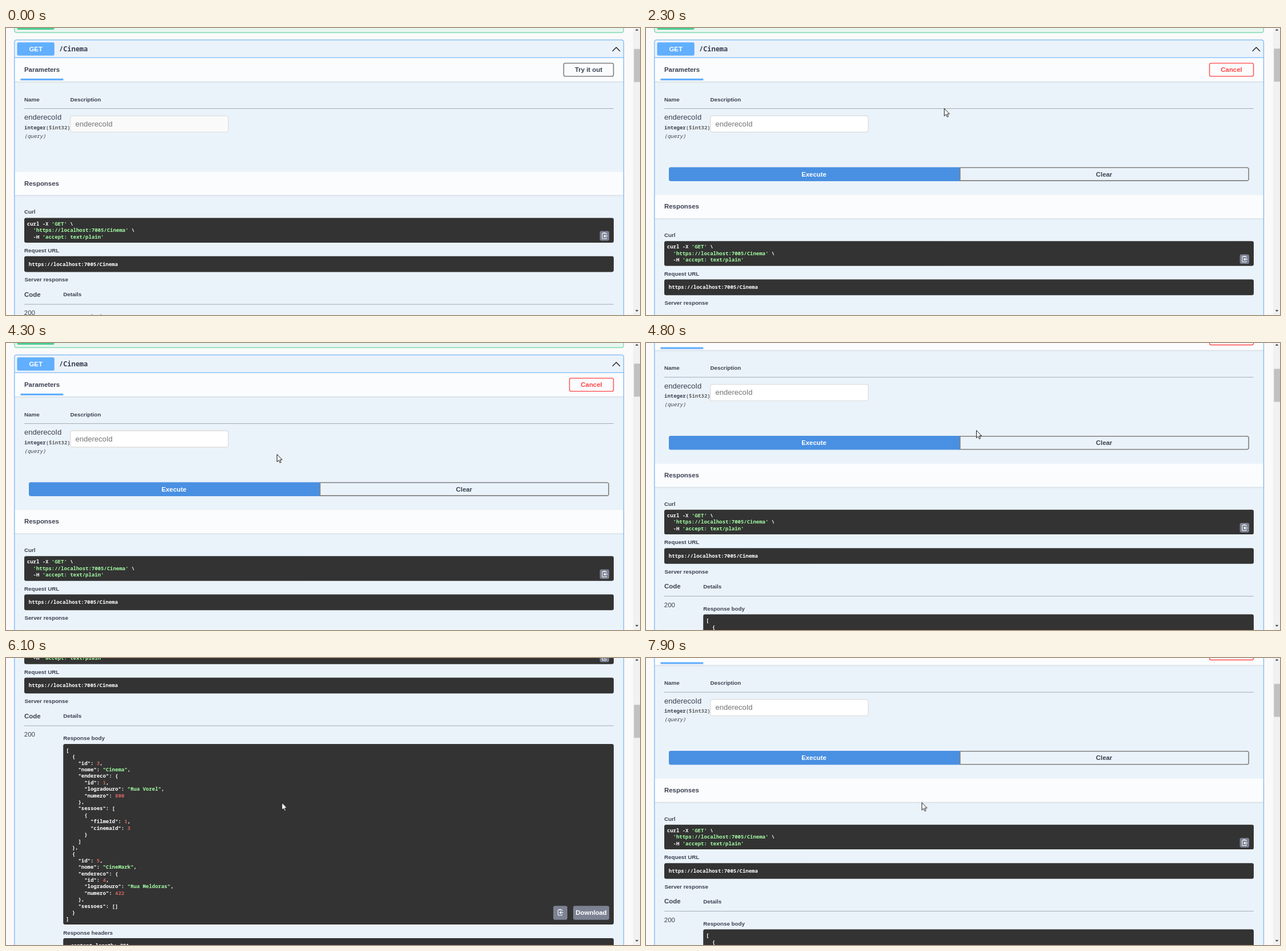
An HTML page that plays this animation: 1110x504 px, repeating every 8000 ms.

```html
<!DOCTYPE html>
<html lang="en">
<head>
<meta charset="utf-8">
<title>API explorer</title>
<style>
html, body { margin: 0; width: 100%; height: 100%; overflow: hidden; background: #fafafa; }
svg { display: block; }
text { font: bold 9.78px "Liberation Sans", Arial, sans-serif; fill: #3b4151; white-space: pre; }
.md { font-size: 11.41px; }
.lg { font-size: 13.04px; font-weight: normal; }
.plain { font-weight: normal; }
.mid { text-anchor: middle; }
.white { fill: #fff; }
.mono { font: bold 8.97px "Noto Sans Mono", "DejaVu Sans Mono", monospace; }
.path { font-size: 11.95px; }
.code { fill: #fff; }
.str { fill: #a2fca2; }
.num { fill: #d36363; }
.box { fill: #333; }
.chip { fill: #7d8293; }
.section { fill: #fbfcfe; filter: drop-shadow(0 1px 1px rgba(0, 0, 0, .12)); }
.rule { stroke: #3b4151; stroke-opacity: .45; stroke-width: .9; }
.btn { fill: #fbfcfe; stroke: #808080; stroke-width: 1.63; }
.clear { fill: none; }
.cancel { stroke: #ff6060; }
.cancel-label { fill: #f44; }
.field { fill: #fafafa; stroke: #d9d9d9; }
.hint { fill: #757575; }
.glow { filter: drop-shadow(0 0 2.2px rgba(0, 0, 0, .45)); }

.move { animation: 8s step-end -20ms infinite; }
#page { animation-name: scroll; }
#thumb { animation-name: thumb; }
#rest { animation-name: push; }
.before { animation-name: before; }
.after { animation-name: after; }
#tryGlow { animation-name: try-hover; }
#runGlow { animation-name: run-hover; }
#focus { animation-name: focus; }
#caret { animation-name: caret; }
#cursor { animation-name: pointer; }
#arrow { animation-name: arrow; }
#hand { animation-name: hand; }

@keyframes scroll {
  0% { transform: translateY(0); }
  57.5% { transform: translateY(-81.4px); }
  61.25% { transform: translateY(-162.8px); }
  62.5% { transform: translateY(-244.2px); }
  66.25% { transform: translateY(-325.6px); }
  72.5% { transform: translateY(-407px); }
  91.25% { transform: translateY(-325.6px); }
  92.5% { transform: translateY(-244.2px); }
  93.75% { transform: translateY(-162.8px); }
  98.75%, 100% { transform: translateY(-81.4px); }
}
@keyframes thumb {
  0% { transform: translateY(.7px); }
  22.5% { transform: translateY(0); }
  57.5% { transform: translateY(9.2px); }
  61.25% { transform: translateY(18.4px); }
  62.5% { transform: translateY(27.6px); }
  66.25% { transform: translateY(36.8px); }
  72.5% { transform: translateY(46px); }
  91.25% { transform: translateY(36.8px); }
  92.5% { transform: translateY(27.6px); }
  93.75% { transform: translateY(18.4px); }
  98.75%, 100% { transform: translateY(9.2px); }
}
@keyframes push {
  0% { transform: translateY(0); }
  22.5%, 100% { transform: translateY(40.8px); }
}
@keyframes before {
  0% { visibility: visible; }
  22.5%, 100% { visibility: hidden; }
}
@keyframes after {
  0% { visibility: hidden; }
  22.5%, 100% { visibility: visible; }
}
@keyframes try-hover {
  0%, 22.5%, 100% { visibility: hidden; }
  17.5% { visibility: visible; }
}
@keyframes run-hover {
  0%, 51.25%, 100% { visibility: hidden; }
  47.5% { visibility: visible; }
}
@keyframes focus {
  0%, 50%, 100% { visibility: hidden; }
  36.25% { visibility: visible; }
}
@keyframes caret {
  0%, 43.75%, 100% { visibility: hidden; }
  36.25% { visibility: visible; }
}
@keyframes arrow {
  0%, 23.75%, 51.25%, 100% { visibility: visible; }
  17.5%, 47.5% { visibility: hidden; }
}
@keyframes hand {
  0%, 23.75%, 51.25%, 100% { visibility: hidden; }
  17.5%, 47.5% { visibility: visible; }
}
@keyframes pointer {
  0% { opacity: 0; transform: translate(33px, 0); }
  3.75% { opacity: 1; transform: translate(33px, 0); animation-timing-function: steps(3); }
  7.5% { opacity: 1; transform: translate(300px, 186px); animation-timing-function: steps(5); }
  13.75% { opacity: 1; transform: translate(883px, 117px); }
  15% { opacity: 1; transform: translate(995px, 91px); }
  17.5% { opacity: 1; transform: translate(1003px, 82px); animation-timing-function: steps(2); }
  20% { opacity: 1; transform: translate(1001px, 68px); }
  22.5% { opacity: 1; transform: translate(1001px, 68px); animation-timing-function: steps(7); }
  31.25% { opacity: 1; transform: translate(330px, 170px); }
  36.25% { opacity: 1; transform: translate(321px, 182px); }
  40% { opacity: 1; transform: translate(420px, 195px); }
  41.25% { opacity: 1; transform: translate(521.5px, 209.5px); }
  43.75% { opacity: 1; transform: translate(521.5px, 209.5px); animation-timing-function: steps(3); }
  47.5% { opacity: 1; transform: translate(318px, 258px); }
  50% { opacity: 1; transform: translate(318px, 258px); animation-timing-function: steps(5); }
  56.25% { opacity: 1; transform: translate(578px, 153px); }
  75% { opacity: 1; transform: translate(530px, 204px); }
  76.25%, 100% { opacity: 1; transform: translate(482.5px, 253.5px); }
}
</style>
</head>
<body>
<svg width="1110" height="504" viewBox="0 0 1110 504">
  <defs>
    <g id="clip" fill="none" stroke="#fff">
      <path d="M3 -2.5V-4.5H-4V5H3V3.2"/>
      <path d="M-2 -5.2H1M5 .4H-1M1.2 -1.8L-1 .4L1.2 2.6" stroke-width="1.2"/>
    </g>
  </defs>

  <g id="page" class="move">
    <rect x="14.9" y="-40" width="1066.4" height="48" rx="3.3" fill="#e8f6f0" stroke="#49cc90"/>
    <rect x="19.5" y="-20" width="65" height="23" rx="2.5" fill="#49cc90"/>

    <rect x="14.9" y="21" width="1066.4" height="1100" rx="3.3" fill="#ebf3fa" style="filter:drop-shadow(0 0 1.3px rgba(0,0,0,.19))"/>
    <rect x="19.5" y="25.2" width="65.2" height="23.2" rx="2.5" fill="#61affe"/>
    <text class="md white mid" x="52.2" y="41">GET</text>
    <text class="mono path" x="93" y="41">/Cinema</text>
    <path d="M1061.8 40.8L1068.4 34L1075 40.8" fill="none" stroke="#222" stroke-width="1.5"/>
    <rect class="section" x="15" y="52.4" width="1066" height="41.4"/>
    <path d="M15 52H1081" stroke="#61affe"/>
    <text class="md" x="32" y="77.2">Parameters</text>
    <rect x="25.5" y="88.8" width="74.8" height="3.2" fill="#61affe"/>

    <g class="move before">
      <rect class="btn" x="976.4" y="61.8" width="87.2" height="23" rx="2.8"/>
    </g>
    <rect id="tryGlow" class="move btn glow" x="976.4" y="61.8" width="87.2" height="23" rx="2.8"/>
    <text class="move before md mid" x="1020" y="77.2">Try it out</text>
    <g class="move after">
      <rect class="btn cancel" x="986.6" y="61.8" width="77" height="23" rx="2.8"/>
      <text class="md mid cancel-label" x="1025" y="77.2">Cancel</text>
    </g>

    <text x="32" y="128.6">Name</text>
    <text x="112.5" y="128.6">Description</text>
    <path class="rule" d="M32 141.5H1064"/>
    <text class="lg" x="32" y="161">enderecoId</text>
    <text class="mono" x="32" y="177.6">integer<tspan fill="#606060">($int32)</tspan></text>
    <text class="mono" x="32" y="192.6" style="font-style:italic;font-weight:normal" fill="#808080">(query)</text>
    <rect class="field" x="112.9" y="154.2" width="276.2" height="28.6" rx="3"/>
    <rect class="move after field" style="fill:#fff" x="112.9" y="154.2" width="276.2" height="28.6" rx="3"/>
    <rect id="focus" class="move" x="112.9" y="154.2" width="276.2" height="28.6" rx="3" fill="#fff" stroke="#101010" stroke-width="1.8"/>
    <text class="lg hint" x="121.4" y="172.8">enderecoId</text>
    <path id="caret" class="move" d="M121.5 161V176" stroke="#222"/>

    <g class="move after">
      <path d="M549.5 244.4H43.3a3.3 3.3 0 0 0 -3.3 3.3V265.6a3.3 3.3 0 0 0 3.3 3.3H549.5Z" fill="#4990e2"/>
      <path class="btn clear" d="M549.8 245.2H1052.4a2.8 2.8 0 0 1 2.8 2.8V265.3a2.8 2.8 0 0 1 -2.8 2.8H549.8Z"/>
      <text class="md mid" x="802" y="260.6">Clear</text>
    </g>
    <rect id="runGlow" class="move glow" x="40" y="244.4" width="509.5" height="24.5" rx="3" fill="#4990e2"/>
    <text class="move after md mid white" x="294" y="260.6">Execute</text>

    <g id="rest" class="move">
      <rect class="section" x="15" y="252.4" width="1066" height="41"/>
      <text class="md" x="32" y="276.6">Responses</text>
      <text x="32" y="326.4">Curl</text>
      <rect class="box" x="32" y="333.4" width="1032" height="43.6" rx="3.3"/>
      <text class="mono code" x="36.8" y="346.6">curl -X <tspan class="str">'GET'</tspan> \</text>
      <text class="mono code" x="36.8" y="358">  <tspan class="str">'https://localhost:7005/Cinema'</tspan> \</text>
      <text class="mono code" x="36.8" y="369.6">  -H <tspan class="str">'accept: text/plain'</tspan></text>
      <rect class="chip" x="1039.6" y="356.6" width="16.4" height="16.8" rx="3"/>
      <use href="#clip" x="1048" y="365"/>

      <text x="32" y="394">Request URL</text>
      <rect class="box" x="32" y="400.8" width="1032" height="27.6" rx="3.3"/>
      <text class="mono code" x="39.8" y="417.6">https://localhost:7005/Cinema</text>

      <text x="32.4" y="445.2">Server response</text>
      <text class="md" x="32" y="472">Code</text>
      <text x="100.2" y="471.2">Details</text>
      <path class="rule" d="M32 485.2H1064"/>
      <text class="md plain" x="31.8" y="504.2">200</text>
      <text x="100.2" y="510.4">Response body</text>
      <rect class="box" x="100.2" y="517.2" width="963.8" height="317" rx="3.3"/>
      <g id="json"></g>
      <rect class="chip" x="958.2" y="801.4" width="24.6" height="24.6" rx="3.3"/>
      <use href="#clip" x="970.5" y="813"/>
      <rect class="chip" x="993" y="801.4" width="63" height="24.6" rx="3.3"/>
      <text class="md mid white" x="1024.6" y="816.8">Download</text>
      <text x="100.2" y="851.8">Response headers</text>
      <rect class="box" x="100.2" y="858.2" width="963.8" height="70" rx="3.3"/>
      <text class="mono code" x="108" y="874.4"> content-length: 291</text>
    </g>

    <rect x="14.9" y="21" width="1066.4" height="1100" rx="3.3" fill="none" stroke="#61affe"/>
  </g>

  <rect x="1098" width="12" height="504" fill="#f1f1f1"/>
  <path d="M1101.6 4.4L1104.5 1.4L1107.4 4.4ZM1101.6 495.2L1104.5 498.2L1107.4 495.2Z" fill="#404040"/>
  <rect id="thumb" class="move" x="1099.4" y="36.2" width="10.6" height="58" fill="#c1c1c1"/>

  <g id="cursor" class="move" stroke="#000" fill="#fff" stroke-linejoin="round">
    <path id="arrow" class="move" d="M.5 .5V13.6L3.5 10.8L5.6 15.4L7.6 14.5L5.6 10H9.6Z" stroke-width=".9"/>
    <path id="hand" class="move" d="M-1.6 1Q0 -.9 1.5 1V6Q2.8 4.9 4 6.5Q5.6 5.6 6.4 7.3Q8.2 6.8 8.2 9V13Q8 15 6.4 18H-1.6Q-3 14.5 -5 11.5Q-5.6 9.4 -3.6 9.6L-1.6 11.5ZM1.5 6V9.4M4 6.6V9.8M6.4 7.4V10.2"/>
  </g>
</svg>
<script>
const cinemas = [
  { id: 3, nome: "Cinema", endereco: { id: 1, logradouro: "Rua Vorel", numero: 800 },
    sessoes: [{ filmeId: 1, cinemaId: 3 }] },
  { id: 5, nome: "CineMark", endereco: { id: 4, logradouro: "Rua Meldoras", numero: 422 },
    sessoes: [] }
];
const paint = line => line
  .replace(/: (\d+)/, ': <tspan class="num">$1</tspan>')
  .replace(/: (".*")/, ': <tspan class="str">$1</tspan>');
document.getElementById("json").innerHTML = JSON.stringify(cinemas, null, 2)
  .split("\n")
  .map((line, i) => `<text class="mono code" x="104.9" y="${531 + i * 11.41}">${paint(line)}</text>`)
  .join("");
</script>
</body>
</html>
```
